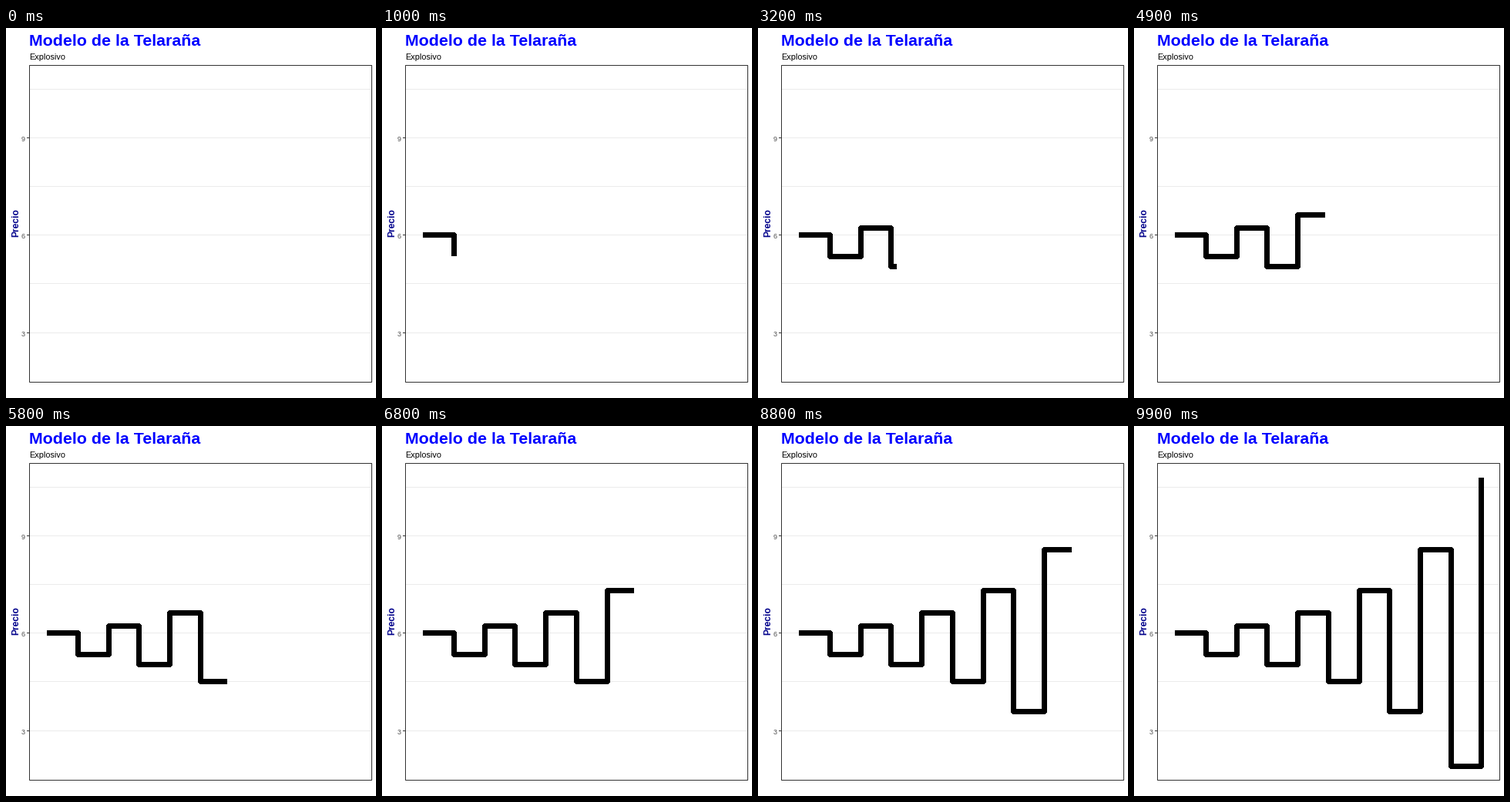
Animation, 480 px wide and 480 px high, one loop 10000 ms. Source, as a matplotlib script:

```python
from math import floor

import matplotlib.pyplot as plt
from matplotlib.animation import FuncAnimation
from matplotlib.patches import Rectangle

SIZE, FRAMES, STEPS = 480, 100, 10
LEFT, RIGHT, TOP, BOTTOM = 30.5, 474.5, 48.5, 459.5

plt.rcParams["font.family"] = "Liberation Sans"


def x_px(period):
    return floor(53.85 + 39.7 * period)


def y_px(price):
    return floor(268.72 - 42.12 * (price - 6))


# Cobweb model: each deviation from equilibrium is -4/3 of the previous one
prices = [40 / 7 + 2 / 7 * (-4 / 3) ** n for n in range(STEPS + 1)]
levels = [y_px(p) for p in prices]
keys = [round(i * (FRAMES - 1) / STEPS) for i in range(STEPS + 1)]

# One unit equals one pixel, with y pointing down
fig = plt.figure(figsize=(SIZE / 72, SIZE / 72), dpi=72, facecolor="white")
ax = fig.add_axes([0, 0, 1, 1])
ax.set(xlim=(0, SIZE), ylim=(SIZE, 0))
ax.axis("off")


def hline(y, x0, x1, color):
    ax.plot([x0, x1], [y + 0.5] * 2, color=color, lw=1, snap=False,
            solid_capstyle="butt", zorder=1)


def label(x, y, text, size, color, **style):
    ax.text(x, y, text, size=size, color=color, va="baseline", **style)


for k in range(2, 8):
    hline(y_px(1.5 * k), LEFT, RIGHT, "#EBEBEB")
for price in (3, 6, 9):
    y = y_px(price)
    hline(y, 27, 30, "#333333")
    label(25, y + 4.8, str(price), 9, "#4D4D4D", ha="right")

ax.add_patch(Rectangle((LEFT, TOP), RIGHT - LEFT, BOTTOM - TOP, fill=False,
                       ec="#333333", lw=1, snap=False, zorder=4))
label(30, 23, "Modelo de la Telaraña", 21.4, "#0000FF", weight="bold")
label(30, 41, "Explosivo", 10.9, "black")
label(16, 271, "Precio", 12, "#00008B", weight="bold", rotation=90,
      rotation_mode="anchor")

(path,) = ax.plot([], [], color="black", lw=7, aa=False, snap=False,
                  solid_capstyle="butt", solid_joinstyle="bevel", zorder=3)


def draw(frame):
    last = max(i for i, key in enumerate(keys) if key <= frame)
    xs, ys = [x_px(0)], [levels[0] + 0.5]
    for i in range(1, last + 1):
        xs += [x_px(i) + 0.5] * 2
        ys += [levels[i - 1] + 0.5, levels[i] + 0.5]
    if frame > keys[last]:
        part = (frame - keys[last]) / (keys[last + 1] - keys[last])
        xs.append(x_px(last + part))
        ys.append(ys[-1])
    elif last:
        ys[-1] = levels[last]
    path.set_data(xs, ys)
    return (path,)


anim = FuncAnimation(fig, draw, frames=FRAMES, interval=100, repeat=True)
plt.show()
```
